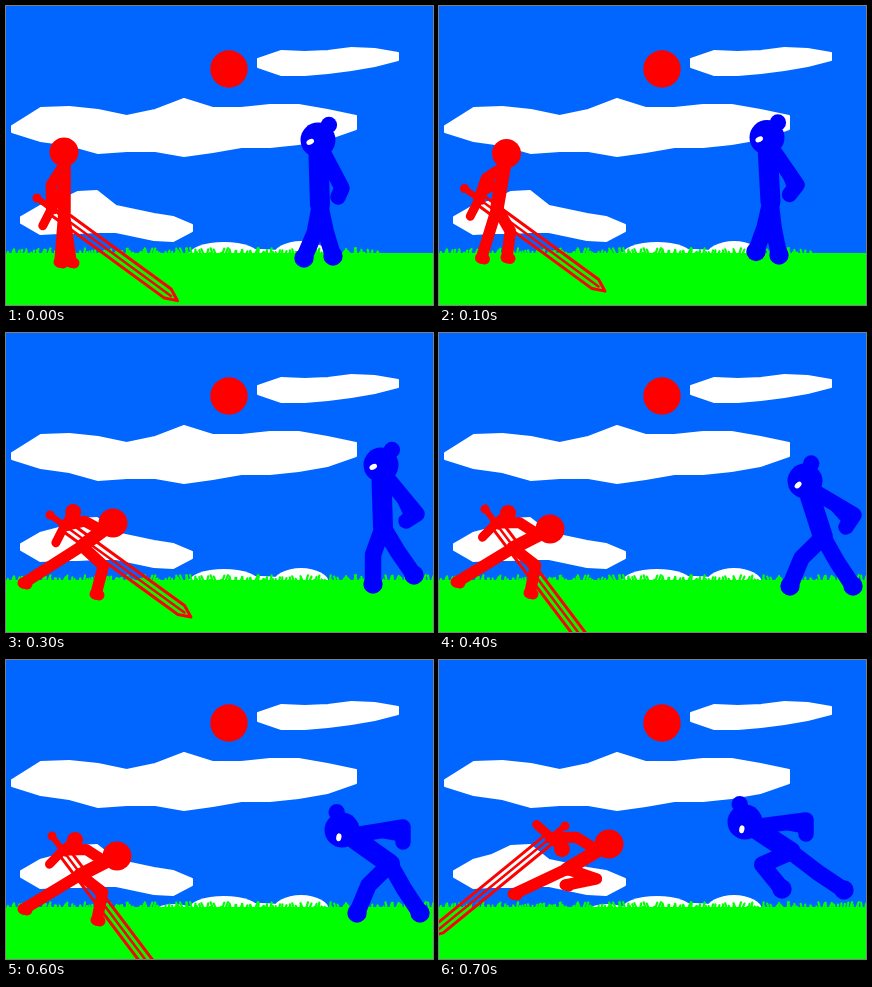
These frames come from a looping animation (427 by 299 pixels, 800 ms). An HTML page with a canvas:

```html
<!DOCTYPE html>
<html lang="en">
<head>
<meta charset="utf-8">
<title>Duel</title>
<style>
html, body { margin: 0; width: 100%; height: 100%; overflow: hidden; background: #06f; }
canvas { display: block; width: 427px; height: 299px; }
</style>
</head>
<body>
<canvas id="stage" width="427" height="299"></canvas>
<script>
const ctx = document.getElementById('stage').getContext('2d');
const W = 427, H = 299, STEP = 100, STEPS = 8, GROUND = 247;
const SKY = '#0066ff', GRASS = '#00ff00', RED = '#ff0000', BLUE = '#0000ff', WHITE = '#ffffff';

// Key poses by step; neck, elbows, knees and grip are derived where possible.
const redKeys = [
  { at: 0, head: [58, 146], hip: [58, 206], back: [54, 256], front: [65, 256], knee: 0, hilt: [31, 192], blade: 0.631 },
  { at: 2, head: [77, 149], hip: [58, 198], back: [31, 248], front: [71, 247], knee: 17, hilt: [20, 173], blade: 0.631 },
  { at: 3, head: [107, 190], hip: [76, 213], back: [18, 250], front: [90, 261], knee: 15, hilt: [44, 182], blade: 0.627 },
  { at: 4, head: [111, 196], hip: [74, 215], back: [18, 249], front: [91, 260], knee: 15, hilt: [46, 176], blade: 0.924 },
  { at: 6, head: [111, 196], hip: [74, 215], back: [18, 249], front: [91, 260], knee: 15, hilt: [46, 176], blade: 0.924 },
  { at: 7, head: [170, 184], hip: [128, 209], back: [75, 234], front: [127, 225], knee: 30, hilt: [126, 166], blade: 2.456 }
];
const blueKeys = [
  { at: 0, head: [312, 134], tilt: 0.63, hip: [314, 199], elbow: [336, 182], hand: [332, 191], left: [298, 252], right: [327, 250], knee: 3 },
  { at: 2, head: [344, 129], tilt: 0.63, hip: [349, 193], elbow: [380, 176], hand: [369, 186], left: [336, 239], right: [353, 248], knee: 0 },
  { at: 3, head: [375, 132], tilt: 0.63, hip: [377, 194], elbow: [411, 181], hand: [400, 188], left: [367, 251], right: [408, 242], knee: -5 },
  { at: 4, head: [366, 148], tilt: 0.34, hip: [384, 204], elbow: [415, 182], hand: [407, 194], left: [351, 253], right: [414, 253], knee: -6 },
  { at: 6, head: [336, 170], tilt: -0.29, hip: [384, 204], elbow: [397, 167], hand: [397, 182], left: [351, 253], right: [414, 253], knee: -6 },
  { at: 7, head: [306, 162], tilt: -0.29, hip: [352, 192], elbow: [367, 160], hand: [367, 174], left: [343, 229], right: [405, 230], knee: -25 }
];

const mix = (a, b, t) => Array.isArray(a) ? a.map((v, i) => mix(v, b[i], t)) : a + (b - a) * t;
const polar = ([x, y], angle, r) => [x + Math.cos(angle) * r, y + Math.sin(angle) * r];
const toward = (a, b, r) => polar(a, Math.atan2(b[1] - a[1], b[0] - a[0]), r);

function poseAt(keys, step) {
  const i = keys.findIndex(k => k.at >= step);
  const b = keys[i], a = keys[Math.max(i - 1, 0)];
  const t = b.at === a.at ? 0 : (step - a.at) / (b.at - a.at);
  const pose = {};
  for (const k in a) pose[k] = mix(a[k], b[k], t);
  return pose;
}

function ink(color) {
  ctx.fillStyle = ctx.strokeStyle = color;
}

function path(points) {
  ctx.beginPath();
  for (const [x, y] of points) ctx.lineTo(x, y);
}

function line(width, ...points) {
  ctx.lineWidth = width;
  path(points);
  ctx.stroke();
}

function oval([x, y], rx, ry = rx, turn = 0) {
  ctx.beginPath();
  ctx.ellipse(x, y, rx, ry, turn, 0, Math.PI * 2);
  ctx.fill();
}

// A limb whose middle joint sits off the straight line by bend.
function limb(width, a, b, bend) {
  const angle = Math.atan2(b[1] - a[1], b[0] - a[0]);
  line(width, a, polar(mix(a, b, 0.5), angle - Math.PI / 2, bend), b);
}

// Heights are spread evenly from left to right.
function cloud(left, right, tops, bottoms) {
  const edge = ys => ys.map((y, i) => [left + (right - left) * i / (ys.length - 1), y]);
  path([...edge(tops), ...edge(bottoms).reverse()]);
  ctx.closePath();
  ctx.fill();
  ctx.lineWidth = 2;
  ctx.stroke();
}

function drawSky(step) {
  ink(SKY);
  ctx.fillRect(0, 0, W, H);
  ink(WHITE);
  cloud(252, 392, [53, 45, 46, 45, 42, 43, 47], [61, 69, 69, 67, 64, 60, 54]);
  cloud(6, 350, [120, 102, 101, 104, 110, 104, 93, 102, 102, 99, 99, 104, 110],
    [126, 135, 139, 147, 145, 145, 150, 146, 141, 141, 138, 133, 123]);
  cloud(15, 186, [211, 200, 195, 186, 185, 200, 204, 208, 211, 219],
    [217, 228, 227, 227, 226, 226, 230, 234, 235, 225]);
  oval([218, 250], 36, 14);
  oval([255, 250], 30, 7);
  oval([295, 250], 28, 15);
  if (step > 4) oval([168, 250], 18, 6);
  ink(RED);
  oval([223, 63], 18.7);
}

function drawGrass(step) {
  ink(GRASS);
  ctx.fillRect(0, GROUND, W, H - GROUND);
  let seed = 7;
  const rnd = () => (seed = seed * 16807 % 2147483647) / 2147483647;
  const edge = step < 3 ? 378 : W;
  for (let x = 0; x < edge; x += 3) {
    line(2.2, [x, GROUND + 2], [x + rnd() * 6 - 3, GROUND - rnd() * 5]);
  }
}

function drawSword(hilt, angle) {
  ctx.save();
  ctx.translate(...hilt);
  ctx.rotate(angle);
  oval([0, 0], 4.5);
  line(6, [0, 0], [22, 0]);
  line(9, [21, 19], [18, 0], [17, -16]);
  oval([17, -16], 8);
  line(3, [20, -5.6], [162, -5.6], [174, 0], [162, 5.6], [20, 5.6]);
  line(2.5, [20, 0], [166, 0]);
  ctx.restore();
}

function drawRed(p) {
  ink(RED);
  const neck = toward(p.head, p.hip, 13);
  line(13.5, neck, p.hip);
  limb(11, neck, polar(p.hilt, p.blade, 18), -7);
  limb(11.5, p.hip, p.back, 0);
  limb(11.5, p.hip, p.front, p.knee);
  for (const [x, y] of [p.back, p.front]) line(11, [x - 1, y], [x + 3, y + 1]);
  oval(p.head, 14.5);
  drawSword(p.hilt, p.blade);
}

function drawBlue(p) {
  ink(BLUE);
  const neck = toward(p.head, p.hip, 16);
  const shoulder = [neck[0] + 4, neck[1] - 5];
  line(20, neck, p.hip);
  line(15.5, shoulder, p.elbow, p.hand);
  ctx.fill();
  limb(16.5, p.hip, p.left, p.knee);
  limb(16.5, p.hip, p.right, -1);
  for (const foot of [p.left, p.right]) oval(foot, 9.7);
  const crown = p.tilt - Math.PI / 2;
  oval(p.head, 17.5);
  oval(polar(p.head, crown, 18.5), 8.2);
  ink(WHITE);
  oval(polar(p.head, crown + 3.84, 8), 4, 2.6, p.tilt - 1.1);
}

function render(now) {
  const step = Math.floor(now / STEP) % STEPS;
  ctx.lineCap = ctx.lineJoin = 'round';
  drawSky(step);
  drawGrass(step);
  drawRed(poseAt(redKeys, step));
  drawBlue(poseAt(blueKeys, step));
}

const start = performance.now();
function tick() {
  render(performance.now() - start);
  requestAnimationFrame(tick);
}
tick();
</script>
</body>
</html>
```
